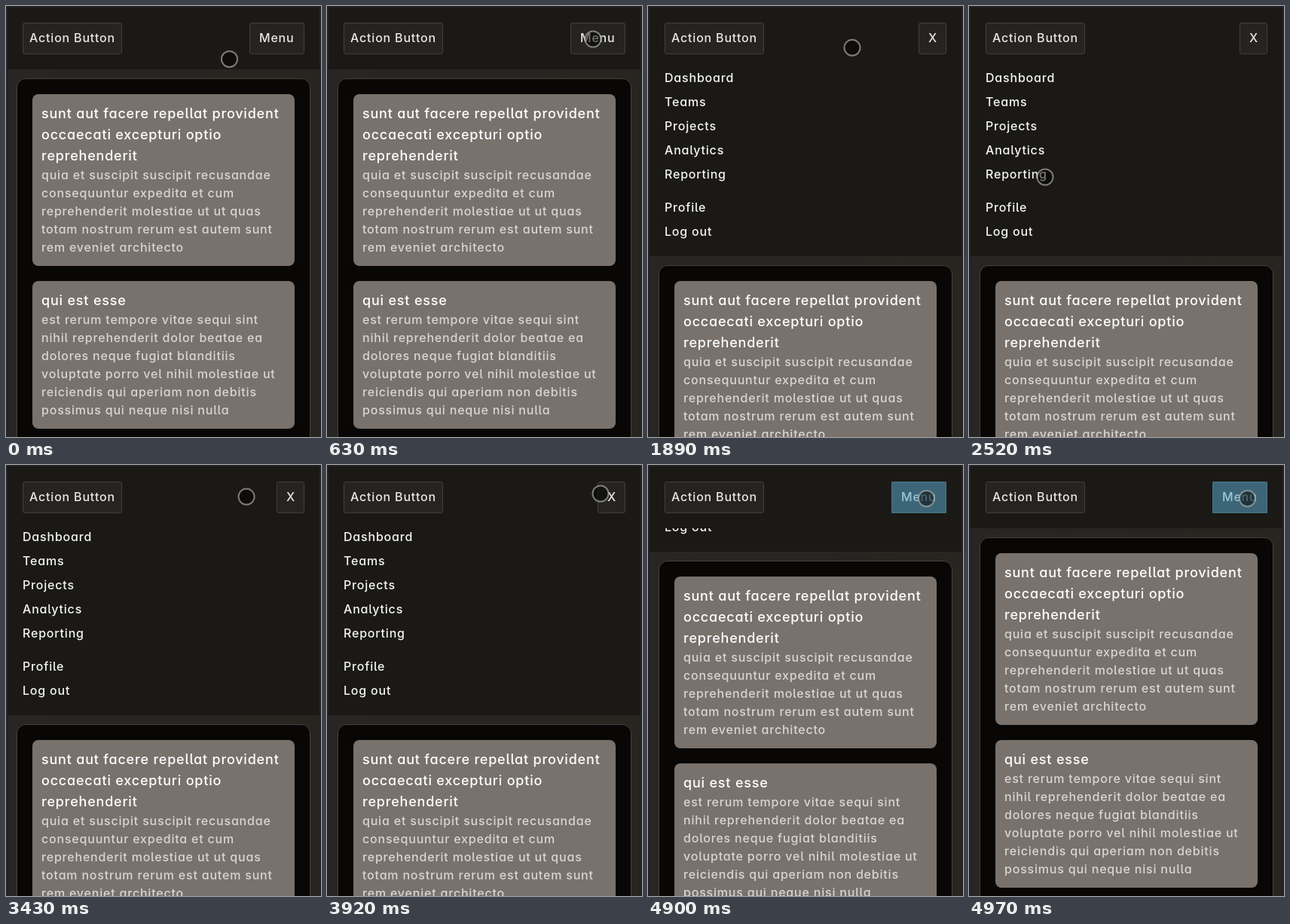
An HTML page that plays this animation: 418 px wide and 572 px high, repeating every 5.04 s.

```html
<!DOCTYPE html>
<html lang="en">
<head>
<meta charset="utf-8">
<title>Collapsible menu</title>
<style>
* { box-sizing: border-box; margin: 0; }
html, body { width: 100%; height: 100%; overflow: hidden; }
body {
  position: relative;
  background: linear-gradient(90deg, #272625, #26251f);
  color: #f5f5f4;
  font: 450 16px/24px Inter, "DejaVu Sans", sans-serif;
  font-feature-settings: "cv11", "cv05";
  font-optical-sizing: none;
  letter-spacing: .05em;
  white-space: nowrap;
}
.frame { position: absolute; inset: 0; border: 2px solid #232324; border-bottom: 0; }
header { position: absolute; left: 2px; right: 2px; top: 2px; background: #1a1916; }
.bar { height: 82px; }
.btn {
  position: absolute; top: 20px; height: 42px; padding: 7px 0 0 8px;
  background: #252422; border: 1px solid #43403c; border-radius: 3px; color: #e9e7e5;
}
#action { left: 20px; width: 132px; }
#toggle { right: 20px; width: 73px; padding-left: 12px; }
#toggle.open { width: 37px; }
#toggle.lit::after {
  content: ""; position: absolute; inset: -1px; background: rgba(84, 168, 206, .5);
}
#nav { position: relative; overflow: hidden; }
#nav ul { position: absolute; left: 20px; bottom: 0; height: 248px; padding: 0; list-style: none; }
#nav li { position: relative; top: -1px; margin-bottom: 8px; }
#nav li:nth-child(5) { margin-bottom: 20px; }
main {
  position: absolute; left: 14px; width: 390px; top: 96px; height: 620px; padding: 20px;
  background: #080705; border: 1px solid #45423d; border-radius: 12px;
}
article { margin-bottom: 20px; padding: 12px; background: #78716c; border-radius: 8px; }
h2, article p { white-space: pre; }
h2 { font-size: 18px; line-height: 28px; font-weight: 450; color: #fff; }
article p { position: relative; top: -1px; color: #d9d6d3; }
svg { position: absolute; left: 0; top: 0; }
</style>
</head>
<body>
<div class="frame"></div>
<header>
  <div class="bar">
    <div class="btn" id="action">Action Button</div>
    <div class="btn" id="toggle">Menu</div>
  </div>
  <div id="nav">
    <ul>
      <li>Dashboard</li>
      <li>Teams</li>
      <li>Projects</li>
      <li>Analytics</li>
      <li>Reporting</li>
      <li>Profile</li>
      <li>Log out</li>
    </ul>
  </div>
</header>
<main>
  <article>
    <h2>sunt aut facere repellat provident
occaecati excepturi optio
reprehenderit</h2>
    <p>quia et suscipit suscipit recusandae
consequuntur expedita et cum
reprehenderit molestiae ut ut quas
totam nostrum rerum est autem sunt
rem eveniet architecto</p>
  </article>
  <article>
    <h2>qui est esse</h2>
    <p>est rerum tempore vitae sequi sint
nihil reprehenderit dolor beatae ea
dolores neque fugiat blanditiis
voluptate porro vel nihil molestiae ut
reiciendis qui aperiam non debitis
possimus qui neque nisi nulla</p>
  </article>
</main>
<svg width="418" height="572" fill="none">
  <g id="cursor">
    <g id="ripple" stroke="#d8d6d4" stroke-opacity=".7">
      <circle id="outer"/>
      <circle id="inner"/>
    </g>
    <circle r="10.5" fill="#000" fill-opacity=".5" stroke="#a8a5a2" stroke-opacity=".72" stroke-width="2"/>
  </g>
</svg>
<script>
const LOOP = 5040, TICK = 70, NAV = 248, RING = 22.5;
const OPEN = 1120, CLOSE = 4830;      // menu starts to move
const WANDER = 1680, STEP = 280;      // pointer's loop across the menu

// Points the pointer passes, one per STEP
const path = [
  [353, 44], [238, 62], [101, 105], [101, 227], [186, 219],
  [246, 128], [306, 50], [351, 38], [363, 38]
];

const el = id => document.getElementById(id);
const toggle = el('toggle'), main = document.querySelector('main');

const within = (t, a, b) => t >= a && t < b;
const part = (t, start, length) => Math.min(1, Math.max(0, (t - start) / length));
const easeOut = u => 1 - (1 - u) ** 3;
const smooth = u => u * u * (3 - 2 * u);
const mix = (a, b, u) => a + (b - a) * u;

// Catmull-Rom curve through the path
function wander(t, axis) {
  const last = path.length - 1;
  const s = part(t, WANDER, STEP * last) * last;
  const i = Math.min(last - 1, Math.floor(s)), u = s - i;
  const at = n => path[Math.min(last, Math.max(0, n))][axis];
  const a = at(i), b = at(i + 1);
  const fromA = (b - at(i - 1)) / 2, fromB = (at(i + 2) - a) / 2;
  return mix(a, b, smooth(u)) + u * (1 - u) * ((1 - u) * fromA - u * fromB);
}

function pointer(t) {
  const arrive = 1 - smooth(part(t, 0, 630));
  const press = smooth(part(t, 4410, 210));
  return [
    wander(t, 0) - 56.5 * arrive + 6.5 * press,
    wander(t, 1) + 26.5 * arrive + 6.5 * press
  ];
}

function draw(now) {
  const t = Math.floor(now % LOOP / TICK) * TICK;
  const open = within(t, OPEN + TICK, CLOSE + TICK);
  const height = NAV * (easeOut(part(t, OPEN, 170)) - easeOut(part(t, CLOSE, 140)));
  const radius = open ? RING * easeOut(part(t, 4550, 210)) : RING;
  const pressed = within(t, OPEN, OPEN + TICK) || within(t, 4620, CLOSE + TICK);

  toggle.textContent = open ? 'X' : 'Menu';
  toggle.classList.toggle('open', open);
  toggle.classList.toggle('lit', within(t, OPEN + TICK, 1400) || t > CLOSE);
  el('nav').style.height = height + 'px';
  main.style.top = 96 + height + 'px';

  el('cursor').setAttribute('transform', `translate(${pointer(t)})`);
  el('ripple').style.display = pressed ? '' : 'none';
  el('outer').setAttribute('r', radius);
  el('inner').setAttribute('r', Math.max(0, radius - 2));
}

const start = performance.now();
function loop() {
  draw(performance.now() - start);
  requestAnimationFrame(loop);
}
loop();
</script>
</body>
</html>
```
